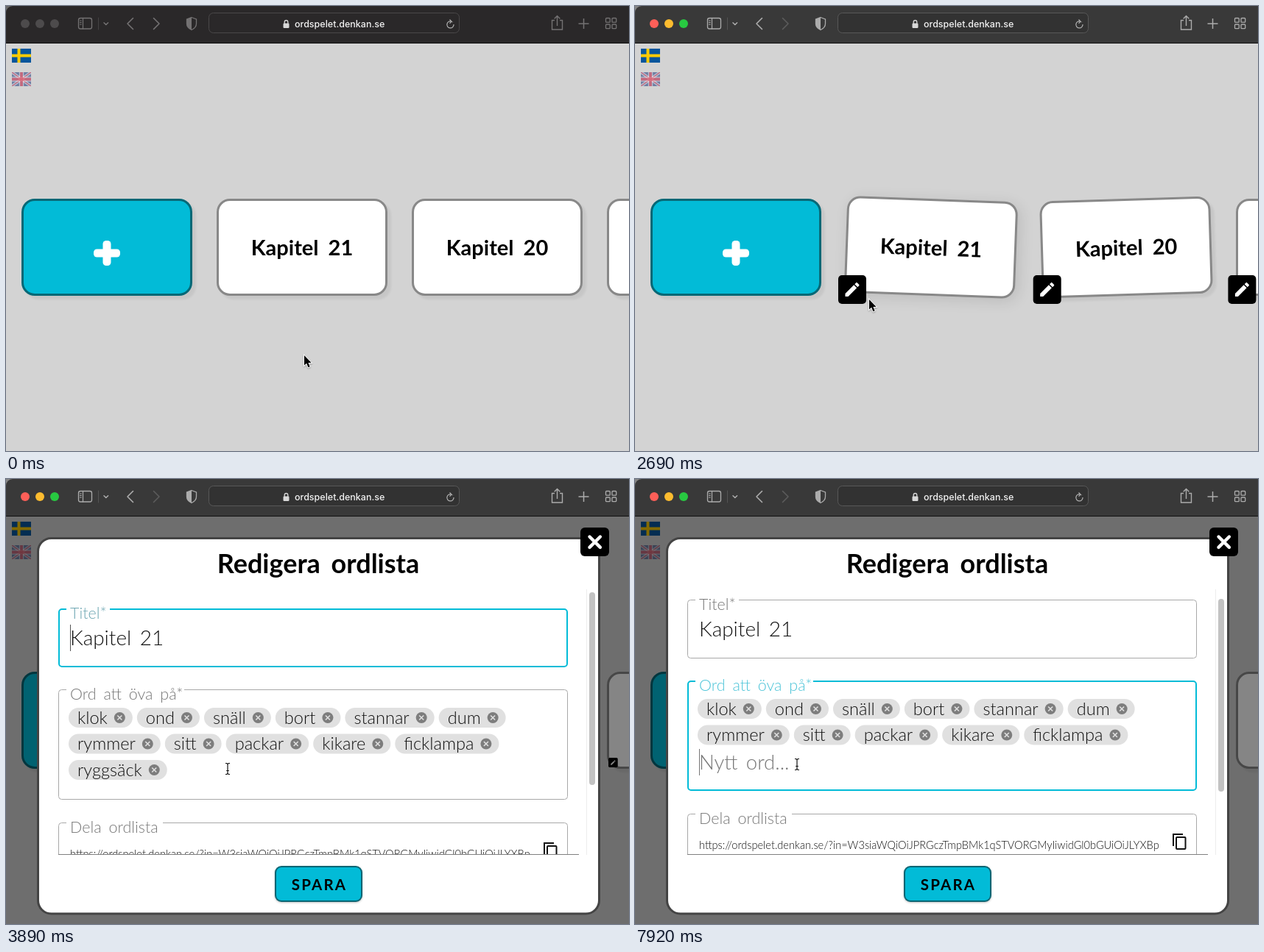
An HTML page with a canvas for the animation above (8000 ms loop, 846 by 605 pixels).

```html
<!DOCTYPE html>
<html lang="sv">
<head>
<meta charset="utf-8">
<title>Ordlista</title>
<style>
  html, body { margin: 0; width: 100%; height: 100%; overflow: hidden; background: #d3d3d3; }
  canvas { display: block; width: 846px; height: 605px; }
</style>
</head>
<body>
<canvas id="stage" width="846" height="605"></canvas>
<script>
const W = 846, H = 605, BAR = 51;
const ctx = document.getElementById('stage').getContext('2d');
const LOOP = 8000, TICK = 149.4;
const TEAL = '#02bbd7', GREY = '#a8a8a8', DARK = '#222';
const hand = (weight, size) => `${weight} ${size}px Lato, sans-serif`;

// Ticks at which the state of the page changes
const ACTIVE = 2, EDIT = 13, MODAL = 26, HOVER = 31, SCROLL = 35, REMOVE = 49;

// Pointer moves: first tick, last tick, goal
const moves = [
  [0, 4, 405, 381], [12, 18, 318, 399], [20, 25, 301, 394], [30, 33, 449, 422],
  [35, 37, 451, 414], [43, 48, 204, 383], [50, 53, 220, 388]
];

const words = 'klok ond snäll bort stannar dum rymmer sitt packar kikare ficklampa ryggsäck'.split(' ');
const link = 'https://ordspelet.denkan.se/?in=W3siaWQiOiJPRGczTmpBMk1qSTVORGMyIiwidGl0bGUiOiJLYXBpd';

const clamp = v => Math.max(0, Math.min(1, v));
const ramp = (k, from, to) => clamp((k - from) / (to - from));
const mix = (a, b, p) => a + (b - a) * p;
const ease = p => p * p * (3 - 2 * p);
const grey = v => `rgb(${v},${v},${v})`;

function scoped(draw) {
  ctx.save();
  draw();
  ctx.restore();
}

function clipRect(x, y, w, h) {
  ctx.beginPath();
  ctx.rect(x, y, w, h);
  ctx.clip();
}

function rect(x, y, w, h, fill) {
  ctx.fillStyle = fill;
  ctx.fillRect(x, y, w, h);
}

function rr(x, y, w, h, r, fill, stroke, lw = 1) {
  ctx.beginPath();
  ctx.roundRect(x, y, w, h, r);
  if (fill) { ctx.fillStyle = fill; ctx.fill(); }
  if (stroke) { ctx.strokeStyle = stroke; ctx.lineWidth = lw; ctx.stroke(); }
}

function disc(x, y, r, fill) {
  ctx.beginPath();
  ctx.arc(x, y, r, 0, Math.PI * 2);
  ctx.fillStyle = fill;
  ctx.fill();
}

function stroke(d, color, lw) {
  ctx.strokeStyle = color;
  ctx.lineWidth = lw;
  ctx.stroke(new Path2D(d));
}

const hLine = (x, y, len) => `M${x} ${y}h${len}`;
const vLine = (x, y, len) => `M${x} ${y}v${len}`;
const cross = (x, y, r) => `M${x - r} ${y - r}l${2 * r} ${2 * r}m0 ${-2 * r}l${-2 * r} ${2 * r}`;

function text(s, x, y, font, color, { align = 'left', word = 0, letter = 0 } = {}) {
  ctx.font = font;
  ctx.fillStyle = color;
  ctx.textAlign = align;
  ctx.wordSpacing = word + 'px';
  ctx.letterSpacing = letter + 'px';
  ctx.fillText(s, x, y);
}

function toolbar(k) {
  const on = k >= ACTIVE;
  const icon = on ? '#acacac' : '#747273';
  rect(0, 0, W, BAR, on ? '#858585' : '#6a6a6a');
  rr(0, 0, W, BAR, [9, 0, 0, 0], on ? '#393939' : '#2a2829');
  rect(0, BAR - 1, W, 1, '#101010');

  ['#fe5f58', '#fdbc2f', '#28c941'].forEach((c, i) => disc(26 + i * 20, 24, 6, on ? c : '#4d4b4c'));

  scoped(() => {
    ctx.lineCap = ctx.lineJoin = 'round';
    rr(98.5, 16.5, 18, 14.5, 2.5, null, icon, 1.3);
    stroke(vLine(104.5, 17, 14), icon, 1.2);
    for (let i = 0; i < 3; i++) stroke(hLine(100.5, 20 + i * 2.5, 1.8), icon, 1.2);
    stroke(vLine(125.5, 16, 16), on ? '#545454' : '#444243', 1);
    stroke('M133 22.7l2.8 2.8l2.8 -2.8', icon, 1.5);
    stroke('M172.5 16.5l-7.5 7.5l7.5 7.5', icon, 1.6);
    stroke('M200.5 16.5l7.5 7.5l-7.5 7.5', k >= EDIT ? '#5c5c5c' : icon, 1.6);
  });

  const shield = 'M252 15.5l6.5 2.5v6q0 5.5 -6.5 8.5q-6.5 -3 -6.5 -8.5v-6z';
  stroke(shield, icon, 1.3);
  scoped(() => {
    ctx.clip(new Path2D(shield));
    rect(245, 15, 7, 18, icon);
  });

  rr(275.5, 9.5, 340, 27, 6, on ? '#323232' : '#2a2829', on ? '#585858' : '#4a4849');
  rr(376.5, 23.5, 8, 6.5, 1.2, '#d8d8d8');
  stroke('M378.2 24v-2.2a2.3 2.3 0 0 1 4.6 0v2.2', '#d8d8d8', 1.3);
  text('ordspelet.denkan.se', 392, 29, '500 12.5px Inter, sans-serif', '#f2f2f2');
  stroke('M608 25a4.6 4.6 0 1 1 -3 -4l-2.5 -2.6m2.5 2.6l-2.5 2.6', '#b4b4b4', 1.2);

  stroke('M745 19.5h-3.5v12.5h14v-12.5h-3.5M748.5 27v-13.5m-3.8 3.7l3.8 -3.8l3.8 3.8', icon, 1.4);
  stroke(hLine(777.5, 24, 14) + vLine(784.5, 17, 14), icon, 1.5);
  for (const x of [814.5, 823])
    for (const y of [16.5, 25]) rr(x, y, 5.7, 5.7, 1, null, icon, 1.3);
}

function flags() {
  rect(8, 58, 26, 19, '#07569c');
  rect(15.5, 58, 4, 19, '#fdcb02');
  rect(8, 65.5, 26, 4, '#fdcb02');
  scoped(() => {
    ctx.globalAlpha = 0.5;
    clipRect(8, 90, 26, 19);
    rect(8, 90, 26, 19, '#0b2a72');
    const diagonal = 'M8 90l26 19m0 -19l-26 19', upright = 'M21 90v19M8 99.5h26';
    stroke(diagonal, '#fff', 4);
    stroke(diagonal, '#d0142c', 1.4);
    stroke(upright, '#fff', 6.4);
    stroke(upright, '#d0142c', 3.8);
  });
}

function card(cx, { fill = '#fff', border = '#888', title = '', turn = 0, lift = 0, halo = 0 }) {
  scoped(() => {
    ctx.translate(cx, 328 - 3.5 * lift);
    ctx.rotate(turn * Math.PI / 180);
    ctx.scale(1 + 0.05 * lift, 1 + 0.05 * lift);
    scoped(() => {
      ctx.shadowColor = `rgba(0,0,0,${mix(0.06, 0.16, halo)})`;
      ctx.shadowBlur = mix(3, 38, halo);
      ctx.shadowOffsetX = ctx.shadowOffsetY = mix(5, 3, halo);
      rr(-116, -66, 232, 132, 18, border);
    });
    rr(-113, -63, 226, 126, 15, fill);
    text(title, 0, 11, hand(700, 29), '#000', { align: 'center', word: 6 });
  });
}

function editButton(cx, size) {
  if (!size) return;
  scoped(() => {
    ctx.translate(cx, 385.5);
    ctx.scale(size, size);
    rr(-19, -19.5, 38, 39, 5, '#000');
    ctx.fillStyle = '#fff';
    ctx.fill(new Path2D('M-9.5 5.5v4h4l11.7 -11.7l-4 -4zM9.2 -5.2a1 1 0 0 0 0 -1.5l-2.5 -2.5' +
      'a1 1 0 0 0 -1.5 0l-1.9 1.9l4 4z'));
  });
}

function cards(k) {
  const editing = k >= EDIT;
  const side = editing && k < MODAL ? (k % 2 ? -1 : 1) : 0;
  const lift = editing ? 0 : ramp(k, 2, 4);
  const press = editing ? 0 : ramp(k, 5, 7);
  const halo = editing ? 1 - ramp(k, 16.5, 19.5) : lift;

  card(137, { fill: TEAL, border: '#066876' });
  rr(119, 330.5, 36, 11, 4.5, '#fff');
  rr(131.5, 319, 11, 34, 4.5, '#fff');
  card(932, {});
  card(667, { title: 'Kapitel 20', turn: -1.75 * side });
  card(402, {
    title: 'Kapitel 21', turn: 2.1 * side, lift, halo,
    fill: grey(mix(255, 231, press)), border: grey(mix(136, 0, lift))
  });

  const size = Math.min(ramp(k, EDIT - 1, EDIT + 1), 1 - ramp(k, MODAL - 1, MODAL + 0.5));
  for (let i = 0; i < 3; i++) editButton(295 + i * 264.7, size);
}

function field(y, h, label, gap, color, focus) {
  const lw = focus ? 2 : 1, o = lw / 2;
  scoped(() => {
    ctx.beginPath();
    ctx.rect(60, y - 4, 720, h + 8);
    ctx.rect(82, y - 2, gap - 82, 6);
    ctx.clip('evenodd');
    rr(71 + o, y + o, 692 - lw, h - lw, 4, null, color, lw);
  });
  text(label, 87, y + 14, hand(300, 21.5), focus || '#777', { word: 4 });
}

function chips(list) {
  const font = hand(300, 23.6);
  let x = 85, y = 324.5;
  for (const word of list) {
    ctx.font = font;
    ctx.wordSpacing = ctx.letterSpacing = '0px';
    const w = ctx.measureText(word).width + 46;
    if (x + w > 750) { x = 85; y += 35.5; }
    rr(x, y - 13.5, w, 27, 13.5, '#e0e0e0');
    text(word, x + 12, y + 8, font, '#111');
    disc(x + w - 17.5, y, 7.5, '#7d7d7d');
    stroke(cross(x + w - 17.5, y, 3), '#e0e0e0', 1.6);
    x += w + 6;
  }
}

function form(k) {
  const removed = k >= REMOVE;
  const lit = k === MODAL ? '#6ba5b1' : '#4cc4d8';
  const [title, list] = removed ? [[GREY], [TEAL, lit]] : [[TEAL, lit], [k >= HOVER ? DARK : GREY]];

  field(176, 80, 'Titel*', 141, ...title);
  text('Kapitel 21', 87, 226, hand(300, 28), '#111', { word: 4 });
  const blink = k < 29 || Math.floor((k - 29) / 3.5) % 2;
  if (!removed && blink) rect(87, 198, 1, 36, '#555');

  field(286, 150, 'Ord att öva på*', 242, ...list);
  chips(removed ? words.slice(0, -1) : words);
  if (removed) {
    text('Nytt ord...', 87, 407, hand(300, 27.5), '#777', { word: 4 });
    rect(87, 379, 1, 36, '#777');
  }

  field(467, 80, 'Dela ordlista', 213, GREY);
  scoped(() => {
    clipRect(87, 490, 625, 40);
    text(link, 87, 515, hand(300, 14.6), '#111');
  });
  stroke('M744 495h-13v16', '#111', 2);
  rr(735, 499, 12.5, 16, 1, null, '#111', 2);
}

function modal(k) {
  rect(0, BAR, W, H - BAR, 'rgba(0,0,0,.48)');
  rr(43.5, 80.5, 762, 510.5, 18, '#fff', '#444', 3);
  text('Redigera ordlista', 424, 128, hand(700, 36), '#000', { align: 'center', word: 6 });

  const scroll = 12 * (1 - (1 - ramp(k, SCROLL, SCROLL + 5)) ** 2.2);
  scoped(() => {
    clipRect(60, 150, 722, 360);
    ctx.translate(0, -Math.round(scroll));
    form(k);
  });
  rect(788, 150, 1, 361, '#ececec');
  rr(792, 154 + scroll * 0.75, 8, 262, 4, '#c2c2c2');
  rect(71, 510, 707, 1, '#808080');

  scoped(() => {
    ctx.shadowColor = 'rgba(0,0,0,.25)';
    ctx.shadowBlur = 3;
    ctx.shadowOffsetY = 1;
    rr(365, 526, 119, 49, 9, '#0a6573');
  });
  rr(367, 528, 115, 45, 7, TEAL);
  text('SPARA', 425.5, 559, hand(700, 20.5), '#000', { align: 'center', letter: 2.2 });

  rr(780, 66, 39, 39, 6, '#000');
  scoped(() => {
    ctx.lineCap = 'round';
    stroke(cross(799.7, 85.7, 7.2), '#fff', 4.4);
  });
}

function pointer(k) {
  let x = 405, y = 475;
  for (const [from, to, goalX, goalY] of moves) {
    const p = ease(ramp(k, from, to));
    x = mix(x, goalX, p);
    y = mix(y, goalY, p);
  }
  const beam = (k >= MODAL && k < HOVER) || k > REMOVE + 1;
  scoped(() => {
    ctx.translate(x, y);
    if (beam) {
      const shape = 'M-3 -7.5h1.8l1.2 1.2l1.2 -1.2h1.8M0 -6.3v12.6M-3 7.5h1.8l1.2 -1.2l1.2 1.2h1.8M-1.8 2.5h3.6';
      stroke(shape, 'rgba(255,255,255,.8)', 2.6);
      stroke(shape, '#111', 1.2);
      return;
    }
    const arrow = 'M0 0v13.6l3.1 -2.8l2.3 5.4l2.3 -1l-2.3 -5.2h4.2z';
    ctx.shadowColor = 'rgba(0,0,0,.3)';
    ctx.shadowBlur = 2;
    ctx.shadowOffsetY = 1;
    stroke(arrow, '#fff', 1.8);
    ctx.shadowColor = 'transparent';
    ctx.fillStyle = '#000';
    ctx.fill(new Path2D(arrow));
  });
}

function draw(ms) {
  const k = Math.floor((ms % LOOP + 5) / TICK);
  rect(0, 0, W, H, '#d3d3d3');
  flags();
  cards(k);
  if (k >= MODAL) modal(k);
  toolbar(k);
  pointer(k);
}

let start;
function loop(now) {
  start ??= now;
  draw(now - start);
  requestAnimationFrame(loop);
}
draw(0);
requestAnimationFrame(loop);
</script>
</body>
</html>
```
